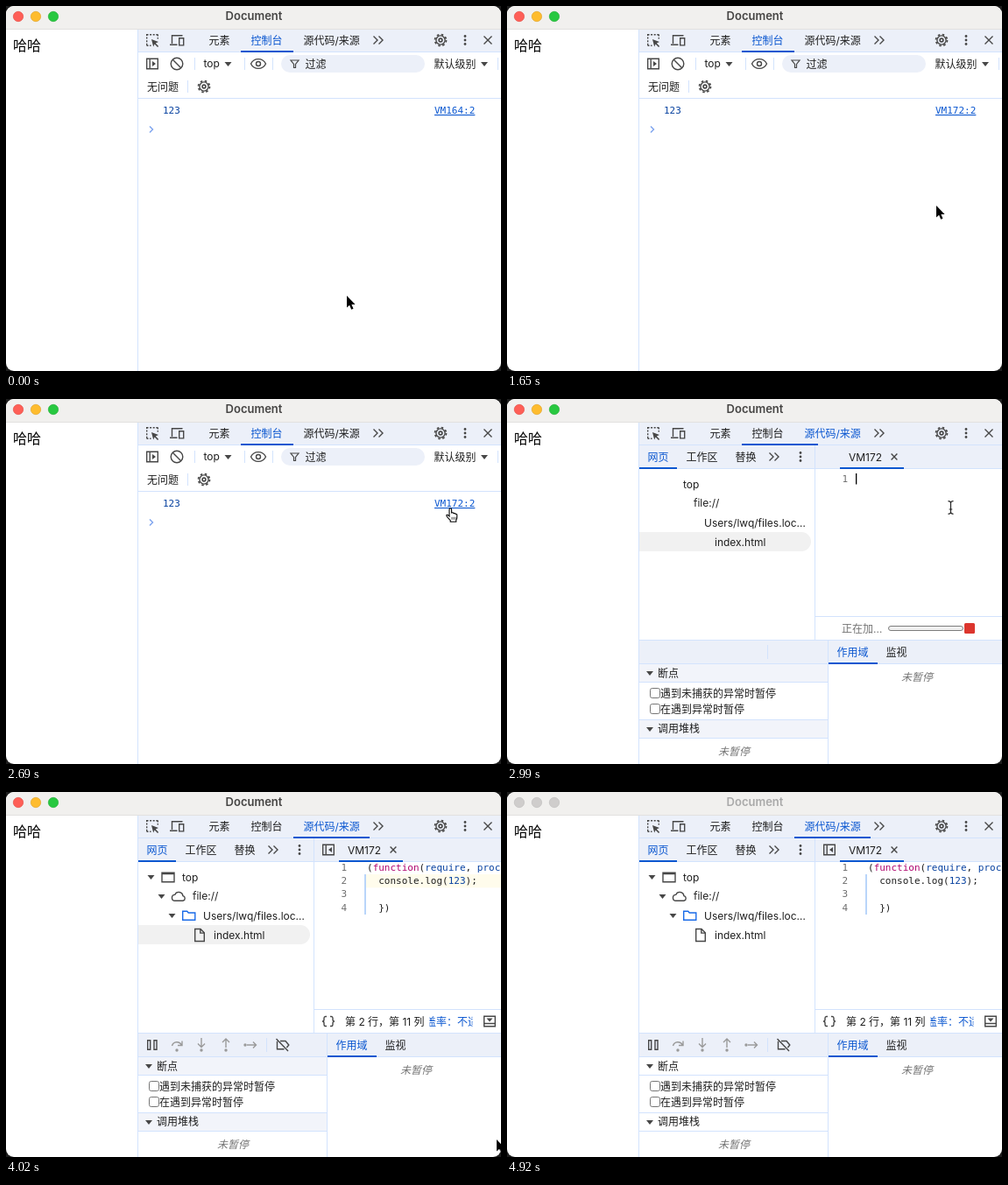
An HTML page for the animation above (4940 ms loop, 565 by 417 pixels).

```html
<!DOCTYPE html>
<html lang="zh-CN">
<head>
<meta charset="utf-8">
<title>Document</title>
<style>
  html, body { margin: 0; width: 100%; height: 100%; overflow: hidden; background: #1d1d1d; }
  svg { display: block; position: absolute; left: 0; top: 0; border-radius: 9px; background: #fff; }
  text { font: 12px Inter, "Noto Sans CJK SC", "Noto Sans CJK", sans-serif; fill: #1f1f1f; white-space: pre; }
  .title { font-size: 13px; font-weight: 600; fill: #454443; text-anchor: middle; }
  .page { font-size: 16px; fill: #000; }
  .code { font: 11px "DejaVu Sans Mono", monospace; }
  .num { text-anchor: end; fill: #6e6e6e; }
  .blue { fill: #0b57d0; }
  .value { fill: #0842a0; }
  .link { fill: #0b57d0; text-decoration: underline; }
  .note { font-style: italic; fill: #757575; text-anchor: middle; }
  .gray { fill: #757575; }
  .cover { font-weight: 500; fill: #0b57d0; }
  .i { fill: none; stroke: #474747; stroke-width: 1.4; }
  .off { stroke: #9a9a9a; }
  .f { fill: #474747; }
  .blur .title { fill: #a9a9a9; }
  .blur .light { fill: #cfcdcc; stroke: #bdbbba; }
  .blur .fades { fill: #fff; }
</style>
</head>
<body>
<script>
const LOOP = 4940;
const BAR = '#ecf0f9', LINE = '#d3e3fd', BLUE = '#0b57d0';

const text = (x, y, s, cls = '') => `<text x="${x}" y="${y}" class="${cls}">${s}</text>`;
const rect = (x, y, w, h, fill, more = '') =>
  `<rect x="${x}" y="${y}" width="${w}" height="${h}" fill="${fill}" ${more}/>`;
const path = (d, cls = 'i', more = '') => `<path d="${d}" class="${cls}" ${more}/>`;
const hline = (x, y, w) => rect(x, y, w, 1, LINE);
const vline = (x, y, h) => rect(x, y, 1, h, LINE);
const group = (id, ...parts) => `<g id="${id}">${parts.join('')}</g>`;
const at = (x, y, s) => `<g transform="translate(${x} ${y})">${s}</g>`;

const gear = (x, y) => at(x, y,
  '<circle r="5.1" class="i"/><circle r="6.5" class="i" style="stroke-width:1.7" stroke-dasharray="2.5 2.605"/>' +
  '<circle r="1.9" class="i" style="stroke-width:1.6"/>');
const dots = (x, y) => [-4.5, 0, 4.5].map(d => `<circle cx="${x}" cy="${y + d}" r="1.4" class="f"/>`).join('');
const chevrons = (x, y) => path(`M${x - 5.5} ${y - 4.5}l4.5 4.5-4.5 4.5M${x + .5} ${y - 4.5}l4.5 4.5-4.5 4.5`);
const cross = (x, y, r) => path(`M${x - r} ${y - r}l${2 * r} ${2 * r}m0 ${-2 * r}l${-2 * r} ${2 * r}`);
const down = (x, y) => path(`M${x - 4} ${y - 2.5}h8l-4 5z`, 'f');
const check = y => rect(163.5, y - 5.5, 11, 11, '#fff', 'rx="2.2" stroke="#767676"');

const lights = [['#fe5f57', '#e2453d'], ['#febc2e', '#dea023'], ['#28c840', '#1eab31']]
  .map(([fill, edge], i) =>
    `<circle cx="${14 + 20 * i}" cy="12" r="5.7" fill="${fill}" stroke="${edge}" stroke-width=".6" class="light"/>`).join('');

const frame = [
  rect(0, 0, 565, 26, '#f1f0ee'), rect(0, 26, 565, 1, '#e2e1df'), lights,
  text(283, 16, 'Document', 'title'),
  text(8, 51, '哈哈', 'page'),
  rect(151, 27, 414, 25, BAR), hline(151, 52, 414), vline(150, 27, 390),
  path('M160.5 32.7h13M160.7 32v13.5M173.3 32.5v5M160.5 45.3h5', 'i', 'stroke-dasharray="2 1.6"'),
  path('M166 38l8 3-3.2 1.5 3.4 3.4-1.2 1.1-3.4-3.4-1.4 3z', 'f'),
  path('M189.5 43v-9.3h12M187 44.3h8.5M197.7 36.7h5v8.2h-5z'),
  text(231.5, 44, '元素'),
  chevrons(425, 39), gear(496, 39), dots(524, 39), cross(550, 39, 4.5)
];

const consoleView = group('console',
  rect(268, 51, 60, 2, BLUE),
  text(279.5, 44, '控制台', 'blue'), text(339.5, 44, '源代码/来源'),
  path('M160.7 60.2h12.6v11.6h-12.6zM164.2 60v12'), path('M167 63l4 3-4 3z', 'f'),
  '<circle cx="195" cy="66" r="6.8" class="i"/>', path('M190.3 61.3l9.4 9.4'),
  vline(215, 59, 14), text(225.5, 70, 'top'), down(253.5, 66.5), vline(272, 59, 14),
  path('M279.5 66c3.6-7.2 13.4-7.2 17 0c-3.6 7.2-13.4 7.2-17 0z'),
  '<circle cx="288" cy="66" r="2.5" class="i"/>', vline(304, 59, 14),
  rect(314, 56, 164, 20, BAR, 'rx="10"'),
  path('M325 62h9l-3.5 4.5v4h-2v-4z', 'i', 'style="stroke-width:1.2"'),
  text(341.5, 70.5, '过滤'), text(488.5, 70.5, '默认级别'), down(546, 66.5), vline(561, 59, 14),
  text(161, 96.5, '无问题'), vline(207, 85, 14), gear(226, 92), hline(151, 105, 414),
  text(179, 123, '123', 'code value'), '<text x="489" y="123" class="code link" id="link"></text>',
  path('M164 137.5l3.5 3.5-3.5 3.5', 'i', 'style="stroke:#7ca3ee"'));

const tree = [['top', 201, 101.5], ['file://', 213, 123], ['Users/lwq/files.loc…', 225, 145.5], ['index.html', 237, 167.5]]
  .map(([s, x, y]) => text(x, y, s)).join('');

const sourcesView = group('sources',
  '<rect id="slider" y="51" width="87" height="2" fill="#0b57d0"/>',
  text(279.5, 44, '控制台'), text(339.5, 44, '源代码/来源', 'blue'),
  rect(151, 53, 414, 26, BAR), hline(151, 79, 414),
  text(160.5, 70.5, '网页', 'blue'), rect(151, 78, 43, 2, BLUE),
  text(204.5, 70.5, '工作区'), text(260.5, 70.5, '替换'), chevrons(305, 66), dots(335, 66),
  path('M151 152H336a11 11 0 0 1 0 22H151z', 'fades', 'fill="#f1f1f1"'), tree,
  vline(351, 53, 222),
  text(390, 70.5, 'VM172'), rect(380, 78, 73, 2, BLUE), cross(442, 66, 3.4),
  hline(352, 248, 213), hline(151, 275, 414),
  rect(151, 276, 414, 26, BAR), hline(151, 302, 414), vline(366, 276, 141), vline(297, 281, 16),
  text(376.5, 293.5, '作用域', 'blue'), rect(367, 301, 56, 2, BLUE), text(432.5, 293.5, '监视'),
  rect(151, 303, 215, 20, '#f2f4fa', 'class="fades"'), hline(151, 323, 215), down(163, 313.5), text(172, 317.5, '断点'),
  check(336), text(175, 340.5, '遇到未捕获的异常时暂停'),
  check(354), text(175, 358.5, '在遇到异常时暂停'),
  hline(151, 366, 215), rect(151, 367, 215, 20, '#f2f4fa', 'class="fades"'), hline(151, 387, 215),
  down(163, 377.5), text(172, 381, '调用堆栈'),
  text(259, 406.5, '未暂停', 'note'), text(468, 321.5, '未暂停', 'note'));

const loading = group('loading',
  text(389, 95, '1', 'code num'), rect(398, 85, 1.3, 12.5, '#000'),
  text(382, 266.5, '正在加…', 'gray'),
  rect(435.5, 259.5, 85, 5, '#efefef', 'rx="2.5" stroke="#7d7d7d"'),
  rect(522, 256, 12, 12, '#dc362e', 'rx="1.5"'));

const span = (color, s) => `<tspan fill="${color}">${s}</tspan>`;
const code = [
  '(' + span('#b0066f', 'function') + '(' + span('#0842a0', 'require') + ', ' + span('#0842a0', 'process'),
  '  console.log(' + span('#0842a0', '123') + ');', '', '  })'
];
const stepIcon = (x, d) => at(x, 289, path(d, 'i off') + '<circle cy="6" r="1.7" fill="#9a9a9a"/>');

const loaded = group('loaded',
  path('M361.7 60.2h12.6v11.6h-12.6zM365.2 60v12'), path('M372 63l-4 3 4 3z', 'f'),
  down(165.5, 97.5), path('M178 92.2h14v10.6h-14zM178 93.5h14'),
  down(177.5, 119.5), path('M193 124.2a3.4 3.4 0 0 1-.3-6.8a4.8 4.8 0 0 1 9.2 1.2a2.9 2.9 0 0 1 .3 5.6z'),
  down(189.5, 141.5), path('M201.7 136.2h5l1.5 1.8h7.6v8.3h-14.1z', 'i', 'style="stroke:#1a6be8"'),
  path('M215.7 156.5h6.3l4.3 4.3v9.7h-10.6zM221.8 156.5v4.6h4.5'),
  rect(409, 94, 156, 15.3, '#fffcec', 'id="active"'),
  rect(409, 94, 2, 46, '#b9d5fa'),
  code.map((s, i) => text(389, 89.7 + 15.3 * i, i + 1, 'code num') + text(412, 89.7 + 15.3 * i, s, 'code')).join(''),
  rect(477.5, 95, 1.3, 13, '#000', 'id="caret"'),
  path('M366 256.5h-1.3q-1.7 0-1.7 1.8v1.7q0 2-2 2q2 0 2 2v1.7q0 1.8 1.7 1.8h1.3M370 256.5h1.3q1.7 0 1.7 1.8v1.7q0 2 2 2q-2 0-2 2v1.7q0 1.8-1.7 1.8h-1.3'),
  text(387, 266.5, '第 2 行，第 11 列'),
  '<clipPath id="gap"><rect x="483.5" y="250" width="49" height="24"/></clipPath>',
  `<g clip-path="url(#gap)">${text(467, 266.5, '覆盖率：不适用', 'cover')}</g>`,
  path('M545.7 256.2h12.6v11.6h-12.6zM546 264.5h12'), path('M548.5 258.5h7l-3.5 4z', 'f'),
  path('M161.7 283.7h3v10.6h-3zM169 283.7h3v10.6h-3z'),
  stepIcon(195, 'M-5.5 1a5.8 5.8 0 0 1 10.8-1M6-4.5v5h-5'),
  stepIcon(223, 'M0-8v10M-4-1.5l4 4 4-4'),
  stepIcon(251, 'M0 3v-10M-4-3l4-4 4 4'),
  at(279, 289, path('M-4 0h10M3-3.5l3.5 3.5-3.5 3.5', 'i off') + '<circle cx="-6" r="1.7" fill="#9a9a9a"/>'),
  path('M313 284.5h6l3.8 4.5-2.4 3M317.5 293.7h-8v-9M308.5 282l13.5 14'));

const cursors =
  group('arrow', path('M0 0V13.6L3.1 10.8 5.2 15.8 7.5 14.8 5.4 9.9H9.6Z', '', 'fill="#000" stroke="#fff" stroke-width="1.6" paint-order="stroke"')) +
  group('beam', ...[['#fff', 2.6], ['#222', 1.2]].map(([c, w]) =>
    `<path d="M-3-7.3Q0-7.3 0-5.3Q0-7.3 3-7.3M0-5.5V5.5M-3 7.3Q0 7.3 0 5.3Q0 7.3 3 7.3M-1.8 2h3.6" fill="none" stroke="${c}" stroke-width="${w}"/>`)) +
  group('hand', path('M4 9V2.2q0-1.5 1.3-1.5t1.3 1.5V6q2-.7 2.2.6q1.8-.5 2 .7q2-.4 2 1.4v2.5q0 1.6-1 3.1v2H5.2v-1.6L2.6 12Q.2 9.3 1 8.5q1-.9 3 1.5z', '',
    'fill="#fff" stroke="#000" stroke-width="1.1"') + path('M7 10.8v3M9 10.8v3M11 10.8v3', '', 'stroke="#000" stroke-width=".7"')) +
  group('resize', path('M-7 0l4-4v3H3v-3l4 4-4 4V1h-6v3z', '', 'fill="#000" stroke="#fff" stroke-width="1.4" paint-order="stroke"'));

document.body.innerHTML = `<svg width="565" height="417" viewBox="0 0 565 417">${
  frame.join('')}${consoleView}${sourcesView}${loading}${loaded}${cursors}</svg>`;

// time, shape, x, y, scale
const moves = [
  [0, 'arrow', 389, 331], [1650, 'arrow', 490, 228], [1790, 'arrow', 500, 224], [1940, 'arrow', 499.5, 165],
  [2090, 'beam', 502.5, 149], [2240, 'hand', 503, 129], [2390, 'hand', 503, 127], [2540, 'hand', 502, 126],
  [2690, 'hand', 502, 124], [2990, 'beam', 506.5, 124], [3140, 'beam', 506.5, 127],
  [3580, 'beam', 557, 106, 2.2], [3730, 'beam', 541, 183, 2.2], [3870, 'resize', 565, 321],
  [4020, 'arrow', 560, 397], [4170, 'arrow', 547, 404], [4320, 'none', 0, 0]
];

const $ = id => document.getElementById(id);
const show = (id, on) => $(id).style.display = on ? '' : 'none';
const shapes = ['arrow', 'beam', 'hand', 'resize'];
const svg = document.querySelector('svg');

function draw(t) {
  const inSources = t >= 2990, ready = t >= 3140, blurred = t >= 4920;
  $('link').textContent = t < 1050 ? 'VM164:2' : 'VM172:2';
  show('console', !inSources);
  show('sources', inSources);
  show('loading', inSources && !ready);
  show('loaded', ready);
  $('slider').setAttribute('x', ready ? 328 : 268);
  show('caret', ready && !blurred && Math.floor((t - 3140) / 590) % 2 === 0);
  show('active', !blurred);
  svg.classList.toggle('blur', blurred);

  const [, shape, x, y, scale = 1] = moves.findLast(m => m[0] <= t);
  for (const id of shapes) show(id, id === shape);
  if (shape !== 'none') $(shape).setAttribute('transform', `translate(${x} ${y}) scale(${scale})`);
}

const start = performance.now();
function tick() {
  draw((performance.now() - start) % LOOP);
  requestAnimationFrame(tick);
}
tick();
</script>
</body>
</html>
```
